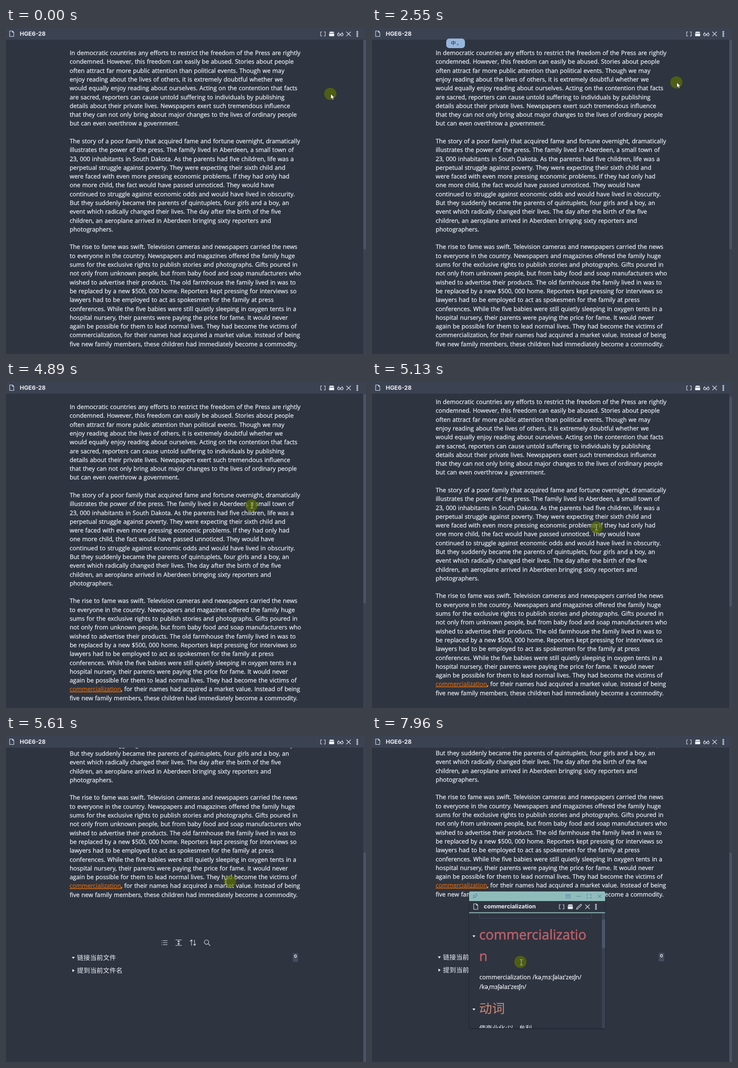
These frames come from a looping animation (786 by 713 pixels, 8 s). An HTML page:

```html
<!DOCTYPE html>
<html lang="en">
<head>
<meta charset="utf-8">
<title>Note reader</title>
<style>
  html, body { margin: 0; width: 100%; height: 100%; overflow: hidden; background: #2e3440; }
  svg { display: block; position: absolute; left: 0; top: 0; }
  text { color: #eceff4; fill: currentColor; stroke: currentColor; stroke-width: .3px;
         font: 13.15px "Open Sans", "Noto Sans", "Noto Sans CJK SC", sans-serif; word-spacing: .6px;
         text-rendering: geometricPrecision; white-space: pre; }
  .ui { font: 700 12.6px Inter, sans-serif; stroke: none; }
  .cjk { font: 14.2px "Noto Sans CJK SC", "Noto Sans CJK", sans-serif; stroke: none; }
  .h1 { font-size: 29.6px; font-weight: 500; color: #bf616a; stroke-width: .6px; }
  .h2 { font: 300 28px "Noto Sans CJK SC", "Noto Sans CJK", sans-serif; color: #d08770; stroke: none; }
  .link { color: #d5680f; fill: currentColor; stroke: currentColor; text-decoration: underline; }
  .ico { fill: none; stroke: #e5e9f0; stroke-width: 1.1; stroke-linecap: round; stroke-linejoin: round; }
  .bar .ico { stroke: #5e81ac; }
  .solid { fill: #eceff4; stroke: none; }
</style>
</head>
<body>
<svg id="stage" width="786" height="713" viewBox="0 0 786 713"></svg>
<script>
const LOOP = 8000, ROW = 19.29, WORD = 'commercialization';
const $ = id => document.getElementById(id);

const paragraphs = `In democratic countries any efforts to restrict the freedom of the Press are rightly
condemned. However, this freedom can easily be abused. Stories about people
often attract far more public attention than political events. Though we may
enjoy reading about the lives of others, it is extremely doubtful whether we
would equally enjoy reading about ourselves. Acting on the contention that facts
are sacred, reporters can cause untold suffering to individuals by publishing
details about their private lives. Newspapers exert such tremendous influence
that they can not only bring about major changes to the lives of ordinary people
but can even overthrow a government.

The story of a poor family that acquired fame and fortune overnight, dramatically
illustrates the power of the press. The family lived in Aberdeen, a small town of
23, 000 inhabitants in South Dakota. As the parents had five children, life was a
perpetual struggle against poverty. They were expecting their sixth child and
were faced with even more pressing economic problems. If they had only had
one more child, the fact would have passed unnoticed. They would have
continued to struggle against economic odds and would have lived in obscurity.
But they suddenly became the parents of quintuplets, four girls and a boy, an
event which radically changed their lives. The day after the birth of the five
children, an aeroplane arrived in Aberdeen bringing sixty reporters and
photographers.

The rise to fame was swift. Television cameras and newspapers carried the news
to everyone in the country. Newspapers and magazines offered the family huge
sums for the exclusive rights to publish stories and photographs. Gifts poured in
not only from unknown people, but from baby food and soap manufacturers who
wished to advertise their products. The old farmhouse the family lived in was to
be replaced by a new $500, 000 home. Reporters kept pressing for interviews so
lawyers had to be employed to act as spokesmen for the family at press
conferences. While the five babies were still quietly sleeping in oxygen tents in a
hospital nursery, their parents were paying the price for fame. It would never
again be possible for them to lead normal lives. They had become the victims of
commercialization, for their names had acquired a market value. Instead of being
five new family members, these children had immediately become a commodity.`;

// Icons are drawn around their own centre.
const icons = {
  file: '<path d="M-4.5-6H1.5L4.5-3V6H-4.5ZM1.5-6V-3H4.5"/>',
  brackets: '<path d="M-2.5-4.5H-5V4.5H-2.5M2.5-4.5H5V4.5H2.5"/>',
  archive: '<path class="solid" d="M-4-5H4L5.5-2H-5.5ZM-5.5-1H5.5V4Q5.5 5 4.5 5H-4.5Q-5.5 5-5.5 4Z"/>',
  glasses: '<circle cx="-3.4" cy="1.6" r="2.6"/><circle cx="3.4" cy="1.6" r="2.6"/><path d="M-.8 1.2Q0 .6.8 1.2M-6 1-3.6-3.4M6 1 3.6-3.4"/>',
  pencil: '<path d="M-5.5 5.5-4.4 2 3.4-5.2Q4.6-5.8 5.4-4.8 5.8-4 5.2-3.4L-2.4 4.4Z"/>',
  close: '<path d="M-4.5-4.5 4.5 4.5M4.5-4.5-4.5 4.5"/>',
  small: '<path d="M-3.3-3.3 3.3 3.3M3.3-3.3-3.3 3.3"/>',
  dots: [-4.5, 0, 4.5].map(y => `<circle cy="${y}" r="1.4"/>`).join(''),
  pin: '<path d="M-5 5-1.5 1.5M-4-1 1 4 1.4 1 4.8-2.2 2.2-4.8-1-1.4Z"/>',
  panel: '<path d="M-4.5-4H4.5V4H-4.5ZM-4.5-1.8H4.5M-2 1H2"/>',
  minus: '<path d="M-4.5 0H4.5"/>',
  expand: '<path d="M-1.8-4H-4.5V-1.5M1.8-4H4.5V-1.5M-1.8 4H-4.5V1.5M1.8 4H4.5V1.5"/>',
  list: '<path d="M-2.5-4.5H6.5M-2.5 0H6.5M-2.5 4.5H6.5M-5.5-4.5H-5M-5.5 0H-5M-5.5 4.5H-5"/>',
  spread: '<path d="M-6.5-6H6.5M-6.5 6H6.5M0-4V4M-2-2 0-4 2-2M-2 2 0 4 2 2"/>',
  sort: '<path d="M-3 6V-6M-6-3-3-6-1-4M3.5-6V6M1.5 4 3.5 6 6.5 3"/>',
  search: '<circle cx="-1.2" cy="-1.2" r="4.8"/><path d="M2.4 2.4 6.5 6.5"/>',
  down: '<path class="solid" d="M-3.2-2H3.2L0 2.4Z"/>',
  right: '<path class="solid" d="M-2-3.2V3.2L2.8 0Z"/>'
};
const icon = (name, x, y, id = '') =>
  `<g class="ico" ${id && `id="${id}"`} transform="translate(${x} ${y})">${icons[name]}</g>`;
const box = (x, y, w, h, fill, extra = '') =>
  `<rect x="${x}" y="${y}" width="${w}" height="${h}" fill="${fill}" ${extra}/>`;
const label = (x, y, str, cls = '', style = '') =>
  `<text x="${x}" y="${y}" class="${cls}" style="${style}">${str}</text>`;

const lines = paragraphs.split('\n').map((str, i) =>
  label(139, Math.round(59.1 + i * ROW), str.replace(WORD, `<tspan id="word">${WORD}</tspan>`))).join('');

$('stage').innerHTML = `
<defs><clipPath id="clip">${box(212, 388, 297, 251, '#000')}</clipPath></defs>
${box(0, 0, 786, 713, '#2e3440')}
<g id="doc">
  ${lines}
  ${icon('list', 345.5, 796)}${icon('spread', 377, 796)}${icon('sort', 408, 796)}${icon('search', 439, 796)}
  ${icon('down', 147, 829)}${label(155, 834, '链接当前文件', 'cjk')}
  ${icon('right', 147, 857)}${label(155, 862, '提到当前文件名', 'cjk')}
  ${box(626, 819, 12, 19, '#434c5e', 'rx="2"')}
  ${label(632, 829, '0', 'ui', 'font-size:9.5px;text-anchor:middle')}
</g>
${box(780, 26, 6, 687, '#3b4252')}
${box(780, 25, 6, 459, '#4a5366', 'rx="3" id="thumb"')}
${box(0, 0, 786, 25, '#3b4252')}${box(0, 25, 786, 1, '#353c4a')}
${icon('file', 12.5, 12.5)}${label(30, 16.5, 'HGE6-28', 'ui')}
${icon('brackets', 692, 13, 'run')}${icon('archive', 711, 13)}${icon('glasses', 730, 13)}
${icon('close', 748, 13)}${icon('dots', 767, 13)}
<g id="pop">
  ${box(211, 341, 299, 300, 'rgba(0,0,0,.22)', 'rx="4"')}
  ${box(212, 340, 297, 299, '#2e3440', 'rx="3"')}
  <path fill="#8fbcbb" d="M212 361V343Q212 340 215 340H506Q509 340 509 343V361Z"/>
  ${box(212, 385.5, 297, 2, '#8fbcbb')}
  <g class="bar">${icon('pin', 225, 350)}${icon('panel', 428, 350.5)}${icon('minus', 451, 350.5)}
    ${icon('expand', 474, 350.5)}${icon('small', 497, 350.5)}</g>
  <g id="page">
    ${icon('file', 226.5, 373)}${label(244, 377, WORD, 'ui')}
    ${icon('brackets', 414, 373.5)}${icon('archive', 433, 373.5)}${icon('pencil', 452, 373.5)}
    ${icon('close', 470.5, 373.5)}${icon('dots', 489, 373.5)}
    <g clip-path="url(#clip)">
      <g id="body">
        ${box(234.5, 398.5, 245, 59, 'none', 'rx="3" stroke="#434c5e"')}
        <g transform="translate(248 413) scale(.75)">${icon('down', 0, 0)}</g>
        ${label(254, 415.5, 'METADATA', '', 'font-size:8.5px;font-weight:600')}
        ${box(246, 418, 222, 1, '#434c5e')}
        ${label(245, 439, 'Tags', '', 'font-size:10px')}
        ${box(286, 428, 45, 19, '#434c5e', 'rx="9.5"')}
        ${label(292, 441, '#review', '', 'font-size:9px;color:#8fbcbb')}
        ${icon('down', 222.5, 497)}
        ${label(234, 504, WORD.slice(0, -1), 'h1')}${label(234, 551, WORD.slice(-1), 'h1')}
        ${label(234.5, 591, WORD + " /kəˌmɜːʃəlaɪ'zeɪʃn/")}${label(234.5, 612, "/kəˌmɜʃəlaɪ'zeɪʃn/")}
        ${icon('down', 222.5, 657)}${label(234, 665, '动词', 'h2')}
        ${label(234, 703, '使商业化;以...牟利', 'cjk')}
      </g>
      ${box(502, 388, 7, 251, '#3b4252')}
      ${box(502, 388, 7, 63, '#4c566a', 'rx="3" id="popThumb"')}
    </g>
  </g>
</g>
<g id="pill">${box(162, 23, 41, 21, '#96b6dc', 'rx="7"')}
  ${label(172, 37, '中', 'cjk', 'font-size:11px;color:#1c2530')}${label(185, 37, '。', 'cjk', 'font-size:11px;color:#1c2530')}</g>
<g id="tip">${box(662, 30, 59, 22, '#050608', 'rx="4"')}
  ${label(691.5, 45, 'Execute', 'ui', 'font-size:10.6px;font-weight:500;text-anchor:middle')}</g>
<path id="ring" fill="rgba(92,112,0,.7)"/>
<path id="arrow" d="M0 0V11.5L2.7 9 4.5 13.2 6.5 12.3 4.7 8.3H8.3Z" fill="#fff" stroke="#111" stroke-width=".7"/>
<path id="hand" d="M-1.3 1Q0-.6 1.3 1V5.5L7 6.8Q8.6 7.4 8.3 9.2L7 15H0L-3.7 9.6Q-3.6 7.6-1.3 9.4Z" fill="#fff" stroke="#111" stroke-width=".8"/>
<path id="beam" d="M-3-6H-1L0-5 1-6H3M0-5V5M-3 6H-1L0 5 1 6H3" fill="none" stroke="#c3c8cf"/>`;

// time, ring x, ring y, pointer, pointer offset x, y
const moves = [
  [0, 708, 144, 'arrow'], [180, 710, 139, 'arrow'], [300, 711, 120, 'arrow'], [420, 707, 86, 'arrow'],
  [530, 701, 52, 'arrow'], [650, 695, 28, 'arrow'], [760, 692, 20, 'hand'], [880, 692, 19, 'hand', -1, 1],
  [1460, 692, 16, 'hand'], [1580, 693, 21, 'hand'], [1720, 691, 54, 'arrow'], [1840, 674, 89, 'arrow'],
  [1980, 669, 111, 'arrow'], [2100, 666, 119, 'arrow'], [2550, 664.5, 119, 'arrow'],
  [4650, 655, 131, 'arrow'], [4770, 605, 188, 'beam'], [4890, 536, 270, 'beam'], [5010, 497, 311, 'beam'],
  [5130, 490, 318, 'beam', 0, 0], [5610, 489, 318, 'beam', -9, 1], [5730, 445, 322, 'beam', -6, 1],
  [5850, 358, 327, 'beam'], [5960, 277, 328, 'beam'], [6060, 228, 327, 'hand'], [6150, 212, 325, 'hand', 2, 0],
  [7620, 236, 362, 'arrow'], [7740, 296, 452, 'beam'], [7850, 324, 494, 'beam', 2, 1]
];
const scrolls = [[0, 0], [5130, 11], [5250, 106], [5370, 215], [5490, 305], [5610, 344], [5730, 345]];
const popScrolls = [[0, 0], [7850, 20], [7960, 59]];

const at = (table, t) => table.findLast(row => row[0] <= t);
const show = (id, on) => $(id).style.display = on ? '' : 'none';
const move = (id, x, y) => $(id).setAttribute('transform', `translate(${x} ${y})`);

function draw(t) {
  const during = (a, b = LOOP) => t >= a && t < b;
  const [, x, y, kind, dx = 1, dy = 0] = at(moves, t);
  const click = during(1300, 1460);

  for (const id of ['arrow', 'hand', 'beam']) show(id, id === kind);
  move(kind, x + dx, y + dy);
  move('ring', x, y);
  $('ring').setAttribute('d', `M0-13.3A13.3 13.3 0 0 0 0 13.3${click ? '' : 'A13.3 13.3 0 0 0 0-13.3'}Z`);
  show('ring', !during(1840, 1980));
  $('run').style.stroke = click ? '#4c6a9a' : '';

  show('tip', during(880, 1460));
  show('pill', during(1300, 4400));
  $('word').setAttribute('class', during(3810) ? 'link' : '');

  const s = at(scrolls, t)[1], p = at(popScrolls, t)[1];
  move('doc', 0, -s);
  move('thumb', 0, s * .667);
  show('pop', during(6250));
  show('page', during(6360));
  move('body', 0, -p);
  move('popThumb', 0, p * .22);
}

const start = performance.now();
(function tick() {
  draw((performance.now() - start) % LOOP);
  requestAnimationFrame(tick);
})();
</script>
</body>
</html>
```
